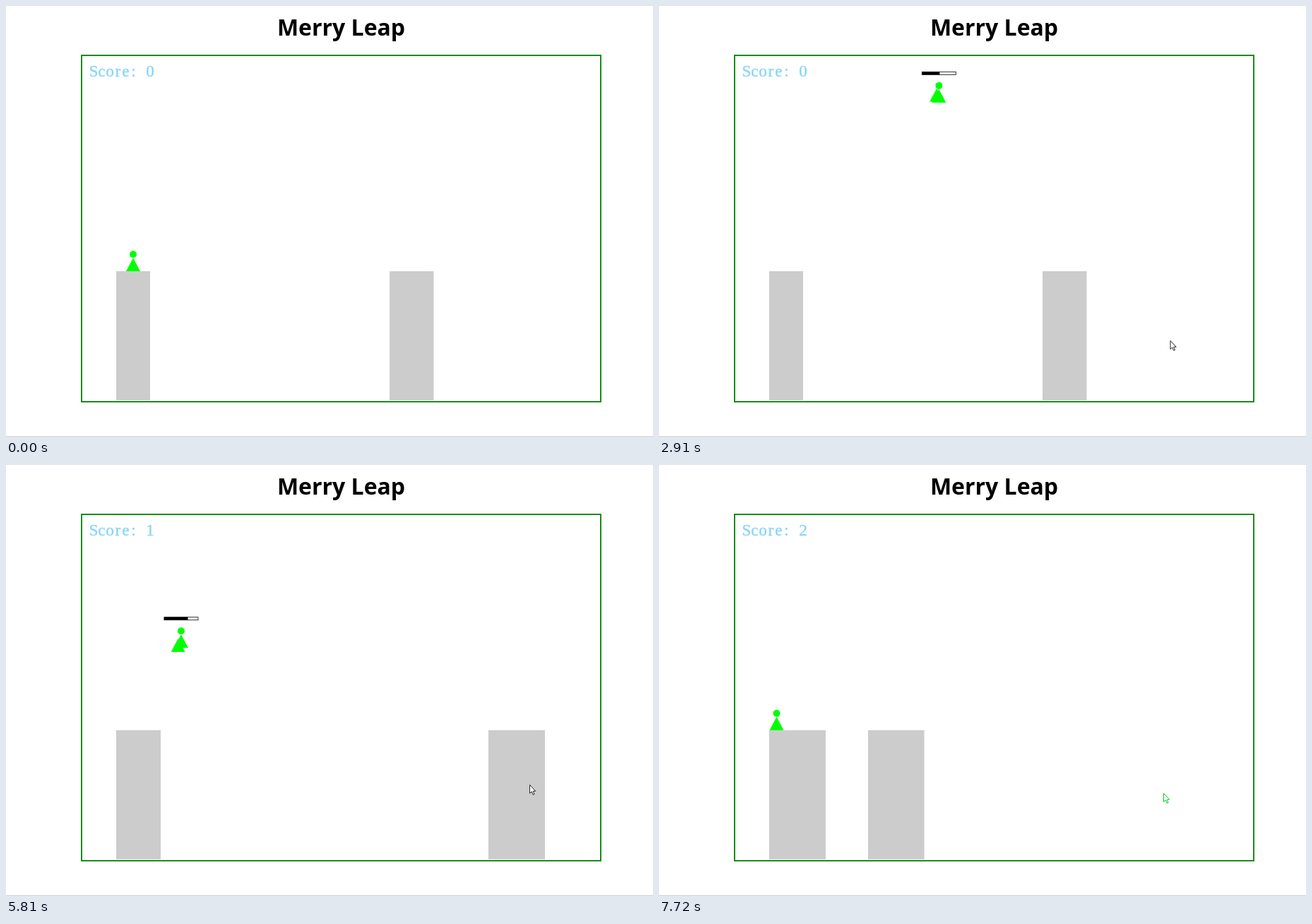
Write an HTML page that moves like this. It is 916 by 611 pixels and loops after 8000 ms.

```html
<!DOCTYPE html>
<html lang="en">
<head>
<meta charset="utf-8">
<title>Merry Leap</title>
<style>
  html, body { margin: 0; width: 100%; height: 100%; overflow: hidden; background: #fff; }
  svg { display: block; }
  .title { font: bold 32px "Open Sans", "Noto Sans", sans-serif; text-anchor: middle; }
  .score { font: 23.3px "Liberation Serif", serif; text-anchor: middle; fill: #87d5fa; stroke: #87d5fa; stroke-width: .4; }
</style>
</head>
<body>
<svg width="916" height="611" viewBox="0 0 916 611">
  <text class="title" x="474.5" y="42">Merry Leap</text>
  <rect x="107" y="70" width="735" height="491" fill="none" stroke="#008000" stroke-width="1.8"/>
  <rect y="610" width="916" height="1" fill="#ccc"/>
  <text class="score" x="124 135.5 147 158.5 169.5 180.5" y="100">Score:</text>
  <text class="score" id="score" x="204" y="100">0</text>
  <g fill="#ccc">
    <rect class="pillar" y="376" height="183"/>
    <rect class="pillar" y="376" height="183"/>
  </g>
  <g fill="#0f0">
    <path id="ghost" d="M0 5 L10 24 H-10 Z"/>
    <g id="player">
      <path d="M0 5 L10 24 H-10 Z"/>
      <circle r="5"/>
      <path id="nick" d="M-4 -1 L0 3.5" stroke="#fff" stroke-width="1.5"/>
    </g>
  </g>
  <g id="bar">
    <rect x="-24" y="-19.5" width="48" height="4" fill="#fff" stroke="#333"/>
    <rect id="fill" x="-24" y="-19.5" height="4"/>
  </g>
  <path id="cursor" d="M.5 .5 V12.5 L3.2 10 L5.2 14.5 L7 13.7 L5.2 9.3 H8.7 Z" fill="#fff"/>
</svg>
<script>
const LOOP = 8000, GROUND = 352, HEIGHT = 243.5, TICK = 1000 / 24, LAG = 1000 / 60;
const $ = id => document.getElementById(id);
const pillars = document.querySelectorAll('.pillar');

// Each round: scene start, charge, take-off, flight time, positions, speed and bar level
const rounds = [
  { from: 0, charge: 960, jump: 1788, air: 1975, x: 180, v: .1932, land: 563, power: .52, phase: 33, pillars: [[156, 48], [543, 62.5]] },
  { from: 3990, charge: 4410, jump: 5527, air: 2000, x: 176.2, v: .2574, land: 693.5, power: .7, phase: 14, pillars: [[156, 63], [683, 80]] },
  { from: 7720, charge: Infinity, jump: Infinity, air: 1, x: 166.5, v: 0, land: 0, power: 0, phase: 14, pillars: [[156, 80], [296, 79.5]] }
];

// Mouse path: time, x, y
const mouse = [
  [40, 843, 567], [220, 724, 474], [579, 724, 474], [580, 712, 462], [659, 712, 462],
  [660, 723.5, 474], [4040, 723.5, 474], [4300, 741, 453], [7150, 741, 453],
  [7240, 729, 461], [7400, 714, 465]
];

function mouseAt(t) {
  const i = mouse.findIndex(k => k[0] > t);
  if (i < 0) return mouse[mouse.length - 1].slice(1);
  const b = mouse[i], a = mouse[Math.max(0, i - 1)];
  const u = a === b ? 0 : (t - a[0]) / (b[0] - a[0]);
  return [a[1] + (b[1] - a[1]) * u, a[2] + (b[2] - a[2]) * u];
}

function pose(r, t) {
  const dt = Math.max(0, t - r.jump), u = dt / r.air;
  return u >= 1 ? [r.land, GROUND] : [r.x + r.v * dt, GROUND - 4 * HEIGHT * u * (1 - u)];
}

const move = (id, p) => $(id).setAttribute('transform', `translate(${p})`);
const show = (id, on) => $(id).setAttribute('visibility', on ? 'visible' : 'hidden');

function draw(t) {
  const index = rounds.findLastIndex(r => t >= r.from), r = rounds[index];
  const now = Math.floor((t - r.phase) / TICK) * TICK + r.phase;
  const u = (now - r.jump) / r.air, landed = u >= 1, flying = u > 0 && !landed;
  const at = pose(r, now);

  r.pillars.forEach(([x, w], i) => {
    pillars[i].setAttribute('x', x);
    pillars[i].setAttribute('width', w);
  });
  $('score').textContent = index + (landed ? 1 : 0);

  move('player', at);
  move('ghost', pose(r, now - LAG));
  show('ghost', flying);
  show('nick', flying && u > .8);

  move('bar', at);
  show('bar', now >= r.charge && !landed);
  const level = (now - r.charge) / (r.jump - r.charge) || 0;
  $('fill').setAttribute('width', 48 * r.power * Math.min(1, Math.max(0, level)));

  const step = Math.floor(t / TICK) * TICK;
  move('cursor', mouseAt(t < 300 ? step : t));
  show('cursor', t >= 40);
  $('cursor').setAttribute('stroke', index === 2 ? '#0c2' : '#222');
}

const start = performance.now();
function frame() {
  draw((performance.now() - start) % LOOP);
  requestAnimationFrame(frame);
}
frame();
</script>
</body>
</html>
```
